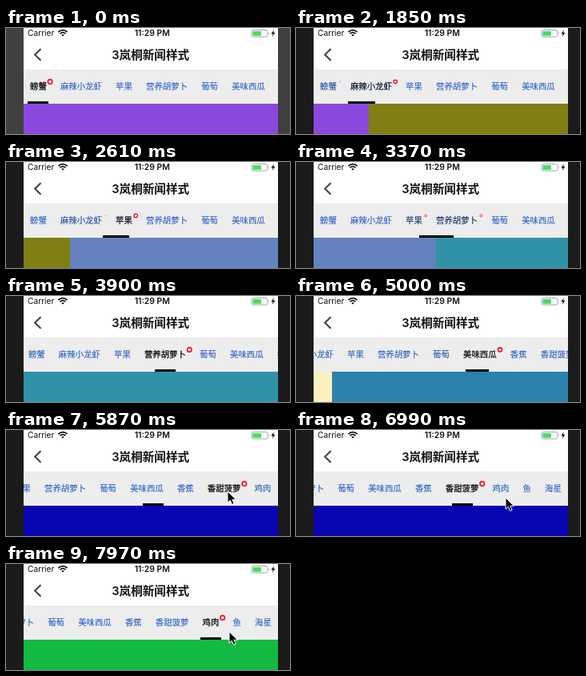
An HTML page for the animation above (8 s loop, 355 by 133 pixels).

```html
<!DOCTYPE html>
<html lang="zh">
<head>
<meta charset="utf-8">
<title>Tab pager</title>
<style>
html, body { margin: 0; width: 100%; height: 100%; overflow: hidden; background: #1b1b1b; }
svg { display: block; width: 355px; height: 133px; }
text { font-family: Inter, "Noto Sans CJK SC", "Noto Sans CJK", sans-serif; }
.tab { font: 10.4px "Noto Sans CJK SC", "Noto Sans CJK", sans-serif; }
</style>
</head>
<body>
<svg id="stage" viewBox="0 0 355 133">
  <defs><clipPath id="screen"><rect x="22" width="318" height="133"/></clipPath></defs>
  <rect id="sides" width="355" height="133"/>
  <g clip-path="url(#screen)">
    <rect x="22" width="318" height="52" fill="#fff"/>
    <text x="27" y="10.3" font-size="10.2" fill="#111">Carrier</text>
    <g fill="none" stroke="#111" stroke-width="1.7">
      <path d="M65.4 5Q71 .4 76.6 5M67.5 7.2Q71 4.2 74.5 7.2"/>
      <path d="M69.2 8.7Q71 7.4 72.8 8.7L71 10.6Z" fill="#111" stroke="none"/>
    </g>
    <text x="182.7" y="10.3" font-size="10.4" font-weight="600" text-anchor="middle" fill="#111">11:29 PM</text>
    <rect x="307" y="2.5" width="20" height="8.6" rx="2.2" fill="#fff" stroke="#999" stroke-width=".9"/>
    <rect x="308.4" y="3.9" width="10.6" height="5.8" rx="1" fill="#4cd964"/>
    <path d="M328.3 5.3q1.4 1.5 0 3z" fill="#999"/>
    <path d="M335 2.2L331.4 7.2H333.7L332.7 10.9L336.5 5.8H334.1Z" fill="#111"/>
    <path d="M43.5 26.2L36.2 33.5L43.5 40.8" fill="none" stroke="#444" stroke-width="2.1"/>
    <text x="180.7" y="38.8" font-size="14.6" font-weight="600" text-anchor="middle" fill="#111">3岚桐新闻样式</text>
    <rect x="22" y="52" width="318" height="43" fill="#ededed"/>
    <g id="strip"></g>
    <rect id="line" y="92" height="3" fill="#000"/>
    <rect id="pageA" y="95" width="318" height="38"/>
    <rect id="pageB" y="95" width="318" height="38"/>
    <path id="cursor" d="M0 0V14.2L3.3 11.2L5.6 16.5L8.1 15.4L5.8 10.3H10.4Z" fill="#000" stroke="#fff" stroke-width="1"/>
  </g>
</svg>
<script>
const LOOP = 8000, LEFT = 22, WIDTH = 318, CENTRE = 181.5, MAX_SCROLL = 192;
const BLUE = [52, 104, 202], BLACK = [18, 18, 18];
const names = ['螃蟹', '麻辣小龙虾', '苹果', '营养胡萝卜', '葡萄', '美味西瓜', '香蕉', '香甜菠萝', '鸡肉', '鱼', '海星'];
const pages = ['#8c48dc', '#7f7f14', '#6482c0', '#3092a6', '#fbf0bc', '#2b82ad', '#e0b040', '#0805b2', '#14ba43'];

// Swipes: start, tab, share already covered, delay until the strip recentres.
const swipes = [[1800, 1, .45, 300], [2550, 2, .45, 300], [3370, 3, .51, 470], [4190, 4, .5, 450], [5000, 5, .925, 330]];
const taps = [[5870, 7], [7470, 8]];
const pointer = [
  [5500, 284, 97], [5630, 277, 77], [5930, 277, 77], [6400, 264, 73], [6925, 264, 73],
  [6930, 263, 79], [6985, 263, 79], [6990, 262, 85], [7165, 262, 85], [7170, 263, 81],
  [7225, 263, 81], [7230, 262, 78], [7650, 262, 78], [7960, 279, 85]
];

const $ = id => document.getElementById(id);
const clamp = (v, lo, hi) => Math.min(hi, Math.max(lo, v));
const mix = (a, b, p) => a + (b - a) * p;
const ease = p => { p = clamp(p, 0, 1); return p * p * (3 - 2 * p); };

function make(tag, attrs, text = '') {
  const el = document.createElementNS('http://www.w3.org/2000/svg', tag);
  for (const key in attrs) el.setAttribute(key, attrs[key]);
  el.textContent = text;
  $('strip').append(el);
  return el;
}

let nextX = 30;
const tabs = names.map(name => {
  const x = nextX, width = name.length * 10.4;
  nextX += width + 17.15;
  return {
    centre: x + width / 2,
    right: x + width,
    label: make('text', { x, y: 77.2, class: 'tab' }, name),
    badge: make('circle', { r: 2.7, fill: '#fff', stroke: '#f0101c', 'stroke-width': 1.7 })
  };
});
const scrollFor = i => clamp(tabs[i].centre - CENTRE, 0, MAX_SCROLL);

function stateAt(t) {
  const s = { from: 0, to: 0, page: 1, line: tabs[0].centre, stretch: 0, scroll: 0 };
  for (const [start, to, covered, delay] of swipes) {
    if (t < start) break;
    const from = s.to;
    const p = 1 - (1 - covered) * Math.exp((start - t) / 55);
    s.from = from;
    s.to = to;
    s.page = p;
    s.line = mix(tabs[from].centre, tabs[to].centre, p);
    s.stretch = 18 * (1 - Math.abs(2 * p - 1));
    s.scroll = mix(scrollFor(from), scrollFor(to), ease((t - start - delay) / 300));
  }
  for (const [start, to] of taps) {
    if (t < start) break;
    const from = s.to;
    const p = ease((t - start + 54) / 320);
    s.from = s.to = to;
    s.page = 1;
    s.line = mix(tabs[from].centre, tabs[to].centre, p);
    s.stretch = 0;
    s.scroll = mix(scrollFor(from), scrollFor(to), p);
  }
  return s;
}

function pointerAt(t) {
  const i = pointer.findIndex(k => k[0] > t);
  if (i < 0) return pointer[pointer.length - 1].slice(1);
  if (i === 0) return null;
  const [a, b] = [pointer[i - 1], pointer[i]];
  const p = (t - a[0]) / (b[0] - a[0]);
  return [mix(a[1], b[1], p), mix(a[2], b[2], p)];
}

function draw(t) {
  const s = stateAt(t);
  $('sides').setAttribute('fill', t < 1440 ? '#404040' : t < 1500 ? '#343434' : t < 1560 ? '#272727' : '#1b1b1b');

  tabs.forEach((tab, i) => {
    const weight = i === s.to ? s.page : i === s.from ? 1 - s.page : 0;
    const colour = `rgb(${BLUE.map((c, k) => Math.round(mix(c, BLACK[k], weight)))})`;
    tab.label.style.fill = tab.label.style.stroke = colour;
    tab.label.style.strokeWidth = mix(.18, .27, weight) + 'px';
    tab.badge.setAttribute('transform', `translate(${tab.right + 4.3} 67.4) scale(${weight})`);
  });
  $('strip').setAttribute('transform', `translate(${-s.scroll} 0)`);

  const width = Math.round(26 + s.stretch);
  $('line').setAttribute('x', Math.round(s.line - s.scroll - width / 2));
  $('line').setAttribute('width', width);

  const split = Math.round(LEFT + WIDTH * (1 - s.page));
  $('pageA').setAttribute('x', split - WIDTH);
  $('pageA').setAttribute('fill', pages[s.from]);
  $('pageB').setAttribute('x', split);
  $('pageB').setAttribute('fill', pages[s.to]);

  const tip = pointerAt(t);
  $('cursor').style.display = tip ? '' : 'none';
  if (tip) $('cursor').setAttribute('transform', `translate(${tip})`);
}

function tick() {
  draw(performance.now() % LOOP);
  requestAnimationFrame(tick);
}
tick();
</script>
</body>
</html>
```
